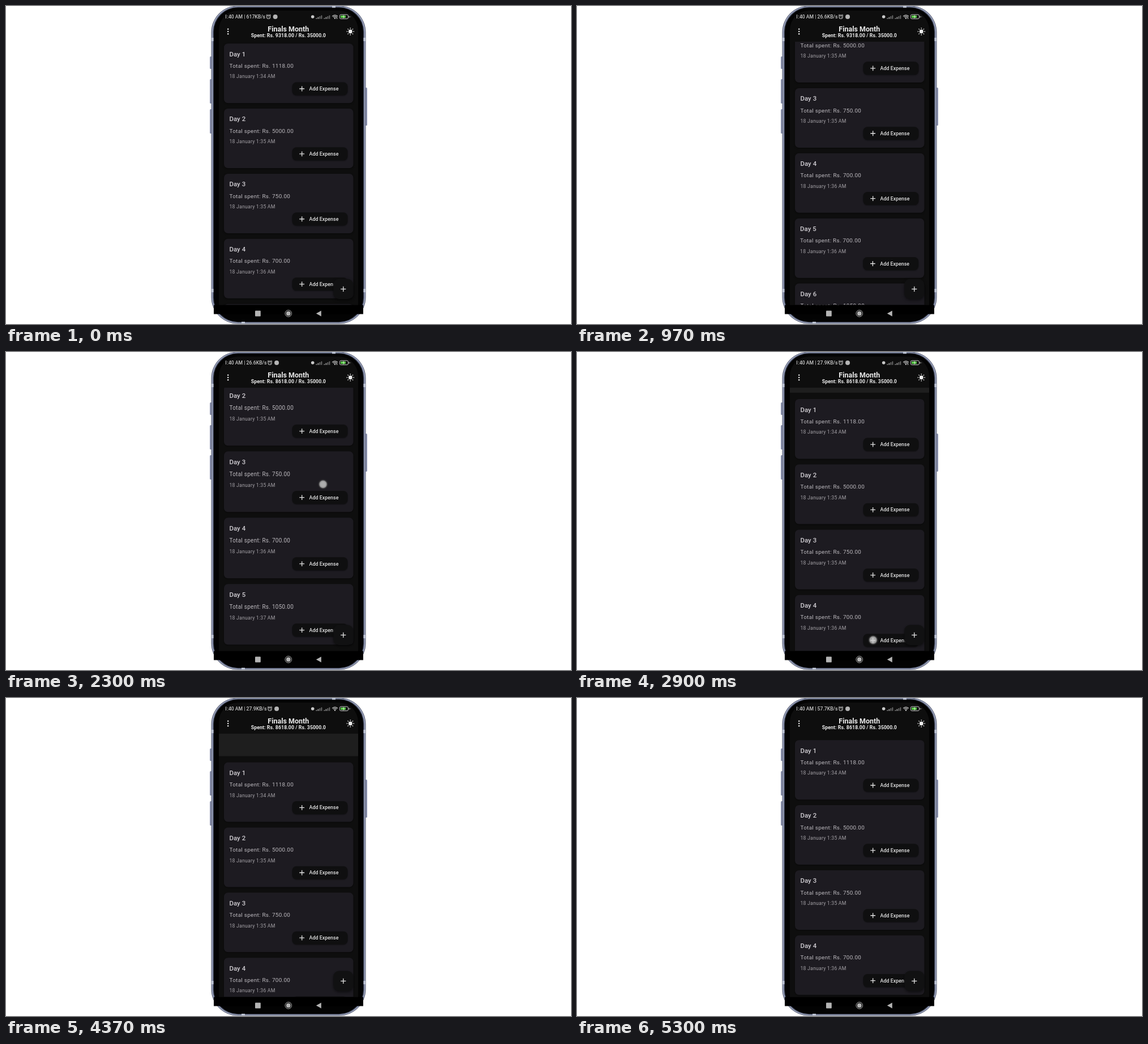
An HTML page with a canvas that plays this animation: 998x561 px, repeating every 5330 ms.

```html
<!DOCTYPE html>
<html lang="en">
<head>
<meta charset="utf-8">
<title>Expense list</title>
<style>
html, body { margin: 0; width: 100%; height: 100%; overflow: hidden; background: #fff; }
canvas { display: block; width: 998px; height: 561px; }
</style>
</head>
<body>
<canvas id="stage" width="998" height="561"></canvas>
<script>
const ctx = document.getElementById('stage').getContext('2d');
const LOOP = 5330;
const VIEW = { left: 376, right: 622, top: 63, bottom: 527.5 };
const CARD = { x: 385, w: 228.5, h: 105, pitch: 114.87, first: 74.2 };
const SCROLL_END = 122.2;
const SWIPED = 4;

const days = [
  ['1118.00', '1:34'], ['5000.00', '1:35'], ['750.00', '1:35'],
  ['700.00', '1:36'], ['700.00', '1:36'], ['1050.00', '1:37']
];

const clamp = (v, a = 0, b = 1) => Math.min(b, Math.max(a, v));
const lerp = (a, b, u) => a + (b - a) * u;
const span = (t, a, b) => clamp((t - a) / (b - a));
const smooth = u => u * u * (3 - 2 * u);
const easeOut = (u, p = 3) => 1 - Math.pow(1 - u, p);

function box(x, y, w, h, r, color) {
  ctx.beginPath();
  ctx.roundRect(x, y, w, h, r);
  ctx.fillStyle = color;
  ctx.fill();
}

function disc(x, y, r, color) {
  ctx.beginPath();
  ctx.arc(x, y, r, 0, Math.PI * 2);
  ctx.fillStyle = color;
  ctx.fill();
}

function ring(x, y, r, color, width, from = 0, to = Math.PI * 2) {
  ctx.beginPath();
  ctx.arc(x, y, r, from, to);
  stroke(color, width);
}

function stroke(color, width) {
  ctx.strokeStyle = color;
  ctx.lineWidth = width;
  ctx.stroke();
}

function line(points, color, width) {
  ctx.beginPath();
  points.forEach(([x, y]) => ctx.lineTo(x, y));
  stroke(color, width);
}

function text(str, x, y, size, weight, color, spacing = 0, align = 'left') {
  ctx.font = `${weight} ${size}px Roboto, sans-serif`;
  ctx.letterSpacing = spacing + 'px';
  ctx.textAlign = align;
  ctx.fillStyle = color;
  ctx.fillText(str, x, y);
  return ctx.measureText(str).width;
}

function plus(x, y, r, color) {
  line([[x - r, y], [x + r, y]], color, 1.3);
  line([[x, y - r], [x, y + r]], color, 1.3);
}

function shadow(color, blur, dy) {
  ctx.shadowColor = color;
  ctx.shadowBlur = blur;
  ctx.shadowOffsetY = dy;
}

function drawPhone() {
  const side = '#8a91ad';
  [[89, 22], [129, 43], [182, 43]].forEach(([y, h]) => box(360, y, 4, h, 1.5, side));
  box(634, 144, 4, 67, 1.5, side);
  box(362.5, -0.5, 273, 561, 47, '#464c61');
  box(363.3, 0.3, 271.4, 559.4, 46, '#98a0ba');
  box(365.6, 1.8, 266.8, 556.4, 44, '#3a4052');
  box(367, 2.8, 264, 554.4, 43, '#030303');
  [59, 502].forEach(y => {
    box(363, y - 3, 3.5, 6, 0, '#bcc3d4');
    box(631.5, y - 3, 3.5, 6, 0, '#bcc3d4');
  });
  box(576, 0, 6, 3, 0, '#bcc3d4');
  box(416, 557, 6, 3, 0, '#bcc3d4');
  box(376, 8, 246, 520, [34, 34, 0, 0], '#0e0e0e');
}

function drawStatus(t) {
  const speed = t < 300 ? '617' : t < 2700 ? '26.6' : t < 4900 ? '27.9' : '57.7';
  const color = '#c9c9c9';
  ctx.save();
  ctx.beginPath();
  ctx.rect(388, 10, 230, 20);
  ctx.clip();
  const end = 385.7 + text(`1:40 AM | ${speed}KB/s`, 385.7, 22.1, 8.65, 500, color);
  const cx = end + 5.6;
  ring(cx, 19.2, 3.1, color, 1.1);
  line([[cx, 17.3], [cx, 19.4], [cx + 1.5, 20.3]], color, 0.8);
  line([[cx - 4.3, 16.6], [cx - 2.2, 14.9]], color, 1);
  line([[cx + 4.3, 16.6], [cx + 2.2, 14.9]], color, 1);
  disc(cx + 12, 19, 4, '#b5b5b5');
  disc(541.7, 19, 2.8, color);
  [547.5, 561.5].forEach(x => {
    for (let i = 0; i < 4; i++)
      box(x + i * 3, 21.2 - i * 1.6, 1.8, 1.6 + i * 1.6, 0.3, i < 2 ? '#a0a0a0' : '#707070');
  });
  [1.6, 4, 6.3].forEach(r => ring(581, 22.4, r, color, 1.3, -Math.PI * 0.77, -Math.PI * 0.23));
  disc(581, 22, 1, color);
  if (t < 3130) line([[584.5, 19.5], [584.5, 23]], color, 1.1);
  ctx.beginPath();
  ctx.roundRect(589.4, 15.2, 15, 7.4, 2.2);
  stroke(color, 1);
  box(591, 16.7, 9, 4.4, 1, '#58c747');
  line([[596.6, 16.2], [595, 19], [597.3, 19], [595.8, 21.7]], '#e8f5e3', 0.8);
  box(605.5, 17.4, 1.2, 3, 0.5, color);
  box(608, 18.2, 1, 1.6, 0.5, '#8a8a8a');
  ctx.restore();
}

function drawAppBar(t) {
  const white = '#ececec';
  const total = t < 1600 ? '9318.00' : '8618.00';
  text('Finals Month', 498.8, 45.1, 12.5, 700, white, 0, 'center');
  text(`Spent: Rs. ${total} / Rs. 35000.0`, 498.9, 55.3, 8.8, 700, white, 0.04, 'center');
  [40.8, 45, 49.2].forEach(y => disc(392.2, y, 1.25, white));
  disc(608.3, 45, 3.4, white);
  for (let i = 0; i < 8; i++) {
    const a = i * Math.PI / 4, c = Math.cos(a), s = Math.sin(a);
    line([[608.3 + c * 4.8, 45 + s * 4.8], [608.3 + c * 6.8, 45 + s * 6.8]], white, 1.2);
  }
}

function drawCard(label, [spent, time], x, y) {
  ctx.save();
  ctx.translate(x, y);
  shadow('rgba(0,0,0,.5)', 3, 1);
  box(0, 0, CARD.w, CARD.h, 7, '#1d1b21');
  shadow('rgba(0,0,0,.4)', 2, 1);
  box(120.5, 68.3, 98, 23, 7.5, '#0f0f10');
  shadow('transparent', 0, 0);
  text(label, 9.4, 22.4, 11.4, 500, '#d0cdd2', 0.08);
  text(`Total spent: Rs. ${spent}`, 9.4, 42.6, 9.95, 400, '#bdbabf', 0.29);
  text(`18 January ${time} AM`, 9.4, 61.2, 8.8, 400, '#a29fa4', 0.17);
  plus(137.7, 79.8, 4.4, '#e4e4e4');
  text('Add Expense', 150.6, 82.9, 8.77, 500, '#e4e4e4', 0.07);
  ctx.restore();
}

// Distance scrolled from the top of the list.
function scrollAt(t) {
  if (t < 1570) return lerp(8, 159, easeOut(span(t, 15, 840), 2.6));
  if (t < 2570) return Math.min(159, SCROLL_END + CARD.pitch * (1 - collapseAt(t)));
  return lerp(SCROLL_END, 0, smooth(span(t, 2570, 2880)));
}

const collapseAt = t => smooth(span(t, 1560, 1800));

// Height of the refresh header.
function headerAt(t) {
  if (t < 2870) return 0;
  if (t < 2900) return 8.8 * span(t, 2870, 2900);
  if (t < 4305) return lerp(8.8, 50, smooth(span(t, 2900, 3100)));
  const k = (t - 4305) * 0.013;
  const h = 50 * (1 + k) * Math.exp(-k);
  return t > 4770 || h < 0.5 ? 0 : h;
}

// Extra drag below the open header, settling after release.
function overdragAt(t) {
  if (t < 2900 || t > 3600) return 0;
  return t < 3100 ? 20 * smooth(span(t, 2900, 3100)) : 20 * Math.pow(1 - span(t, 3100, 3600), 1.3);
}

function stretchAt(t) {
  if (t < 2560) {
    const pull = 0.0185 * easeOut(span(t, 2030, 2300), 2);
    return [1 + pull * (1 - smooth(span(t, 2340, 2540))), VIEW.bottom];
  }
  return [1 + 0.003 * span(t, 2870, 2900) * (1 - span(t, 2900, 3100)), VIEW.top];
}

function drawList(t) {
  const header = headerAt(t);
  const [scale, anchor] = stretchAt(t);
  const collapse = collapseAt(t);
  const swipe = -245 * smooth(span(t, 960, 1500));
  ctx.save();
  ctx.beginPath();
  ctx.rect(VIEW.left, VIEW.top, VIEW.right - VIEW.left, VIEW.bottom - VIEW.top);
  ctx.clip();
  if (header > 0) {
    box(VIEW.left, VIEW.top, 246, header, 0, '#1e1e1e');
    if (t > 3050 && t < 4300) drawSpinner(t, VIEW.top + header - 25);
  }
  ctx.translate(0, anchor);
  ctx.scale(1, scale);
  ctx.translate(0, -anchor);
  const origin = CARD.first + header + overdragAt(t) - scrollAt(t);
  days.forEach((day, i) => {
    if (i === SWIPED && t >= 1500) return;
    const y = origin + i * CARD.pitch - (i > SWIPED ? collapse * CARD.pitch : 0);
    if (y > VIEW.bottom || y + CARD.h < VIEW.top) return;
    const number = i > SWIPED && t >= 1600 ? i : i + 1;
    drawCard(`Day ${number}`, day, CARD.x + (i === SWIPED ? swipe : 0), y);
  });
  ctx.restore();
}

function drawSpinner(t, y) {
  disc(499, y, 8, '#111');
  const a = t * 0.006;
  ring(499, y, 4, '#191919', 1, a, a + 4);
}

function drawFab() {
  ctx.save();
  shadow('rgba(0,0,0,.55)', 5, 2);
  box(578.3, 481.5, 35, 35.5, 10, '#111112');
  ctx.restore();
  plus(595.8, 499.4, 4.6, '#e6e6e6');
}

function drawNav() {
  box(367, VIEW.bottom, 264, 16, 0, '#000');
  const gray = '#b4b4b4';
  box(440, 537.6, 9.8, 9.8, 1, gray);
  ring(498.8, 542.4, 5.8, gray, 1);
  disc(498.8, 542.4, 3.9, gray);
  ctx.beginPath();
  [[547.8, 542.4], [556.8, 537.4], [556.8, 547.4]].forEach(([x, y]) => ctx.lineTo(x, y));
  ctx.fillStyle = gray;
  ctx.fill();
}

function drawTouch(x, y) {
  const glow = ctx.createRadialGradient(x, y, 4, x, y, 9.5);
  glow.addColorStop(0, 'rgba(205,205,205,.82)');
  glow.addColorStop(0.4, 'rgba(180,180,180,.75)');
  glow.addColorStop(0.6, 'rgba(90,90,90,.5)');
  glow.addColorStop(1, 'rgba(60,60,60,0)');
  disc(x, y, 9.5, glow);
}

function drawTouches(t) {
  if (t > 1000 && t < 1260) {
    const u = smooth(span(t, 960, 1500));
    drawTouch(570 - 245 * u, 430);
  } else if (t > 2030 && t < 2345) {
    const u = easeOut(span(t, 2030, 2300), 2);
    drawTouch(lerp(566, 560, u), lerp(310, 233.3, u));
  } else if (t > 2570 && t < 2960) {
    const u = smooth(span(t, 2570, 2900));
    drawTouch(lerp(540, 523, u), lerp(360, 508, u) + 9 * span(t, 2900, 2960));
  }
}

function render(t) {
  ctx.fillStyle = '#fff';
  ctx.fillRect(0, 0, 998, 561);
  drawPhone();
  drawList(t);
  drawStatus(t);
  drawAppBar(t);
  drawFab();
  drawNav();
  drawTouches(t);
}

const start = performance.now();
function tick() {
  render((performance.now() - start) % LOOP);
  requestAnimationFrame(tick);
}
tick();
</script>
</body>
</html>
```
